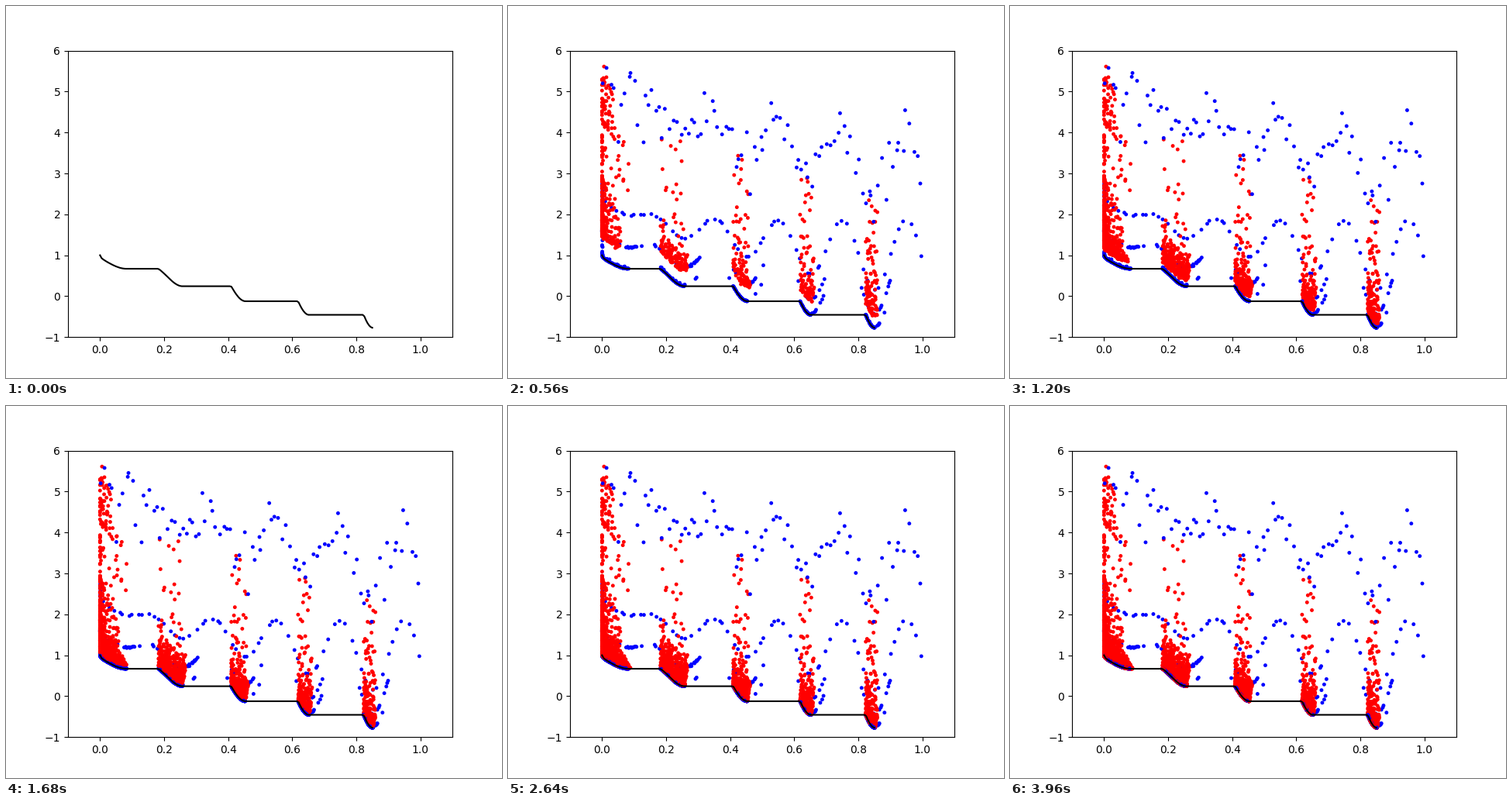
Animation of 640 by 480 pixels, one loop 4000 ms. Source, as a matplotlib script:

```python
import numpy as np
import matplotlib.pyplot as plt
from matplotlib.animation import FuncAnimation

FRAMES, STEP = 100, 40
BLUE, RED = (0, 0, 1), (1, 0, 0)
# Ends of the five pieces of the Pareto front
LOW = np.array([0, 0.182, 0.409, 0.618, 0.823])
HIGH = np.array([0.083, 0.258, 0.454, 0.653, 0.852])
rng = np.random.default_rng(11)


def zdt3(x, g=1.0):
    """Second ZDT3 objective for f1 = x and distance value g."""
    return g - np.sqrt(x * g) - x * np.sin(10 * np.pi * x)


def spaced(n):
    """Evenly spread values in 0..1 with jitter."""
    return (np.arange(n) + rng.random(n)) / n


def pick(n, low, high, weights, power=1.0):
    """Random f1 values inside the pieces; power crowds the first at 0."""
    s = rng.choice(5, n, p=weights)
    u = rng.random(n)
    u[s == 0] **= power
    return np.maximum(low[s] + u * (high - low)[s], 0)


def curve(x, g):
    return np.c_[x, zdt3(x, g)]


def excess(k):
    """Distance of the slow population from the front, minus 1."""
    return 0.48 * np.exp(-0.06 * (k - 15)) + 3 * np.exp(-0.55 * (k - 1))


def slow_points(k):
    e = excess(k)
    far = min(2 * e, 1)
    high = HIGH + 0.009 * far
    high[0] = 0.09 * (1 - 0.35 * far)
    if k <= 6:
        n, weights = 66, [.48, .13, .13, .13, .13]
        spread = rng.uniform(0.8, 1.06, n)
    else:
        n, weights = 45, [.32, .25, .17, .13, .13]
        spread = rng.uniform(0.9, 1.12, n)
    x = pick(n, LOW, high, weights, 1.2 + 4 * min(e, 1))
    points = curve(x, 1 + e * spread)
    if k == 1:
        x = 0.004 + 0.08 * rng.random(36) ** 1.7
        top = 5.9 - 30 * x
        strays = np.c_[x, top - rng.random(36) * 1.2]
        points = np.r_[points, strays]
    return points


def fast_points(k):
    if k == 1:
        return curve(spaced(92), rng.normal(5.4, 0.45, 92))
    if k == 2:
        x, g = spaced(62), 2.46
    elif k == 3:
        x = pick(90, LOW - .02, HIGH + .05, [.25, .3, .15, .15, .15])
        g = 1.6
    elif k == 4:
        x = pick(46, LOW - .012, HIGH + .045, [.2, .3, .15, .15, .2])
        g = 1.05
    else:
        n = 10 if k <= 6 else 40 if k < 20 else 18
        x = pick(n, LOW, HIGH, [.34, .26, .16, .12, .12])
        return curve(x, 1 + rng.uniform(0, 0.012, n))
    front = curve(x, g + rng.normal(0, 0.015, len(x)))
    edge = np.c_[rng.uniform(0, .002, 12), rng.uniform(g - .05, g + .5, 12)]
    return np.r_[front, edge]


points, colors, counts = [], [], [0]
for k in range(1, FRAMES):
    red, blue = slow_points(k), fast_points(k)
    points += [red, blue]
    colors += [RED] * len(red) + [BLUE] * len(blue)
    counts.append(len(colors))
points, colors = np.concatenate(points), np.array(colors)

fig, ax = plt.subplots(figsize=(6.4, 4.8), dpi=100)
ax.set_xlim(-0.1, 1.1)
ax.set_ylim(-1, 6)
xs = np.linspace(0, 1, 201)
xs = xs[xs < 0.853]
ax.plot(xs, np.minimum.accumulate(zdt3(xs)), color="black")
dots = ax.scatter([], [], s=4, linewidths=1.5)


def draw(k):
    n = counts[k]
    dots.set_offsets(points[:n])
    dots.set_color(colors[:n])
    return dots,


anim = FuncAnimation(fig, draw, frames=FRAMES, interval=STEP,
                     repeat=True, repeat_delay=0)
plt.show()
```
